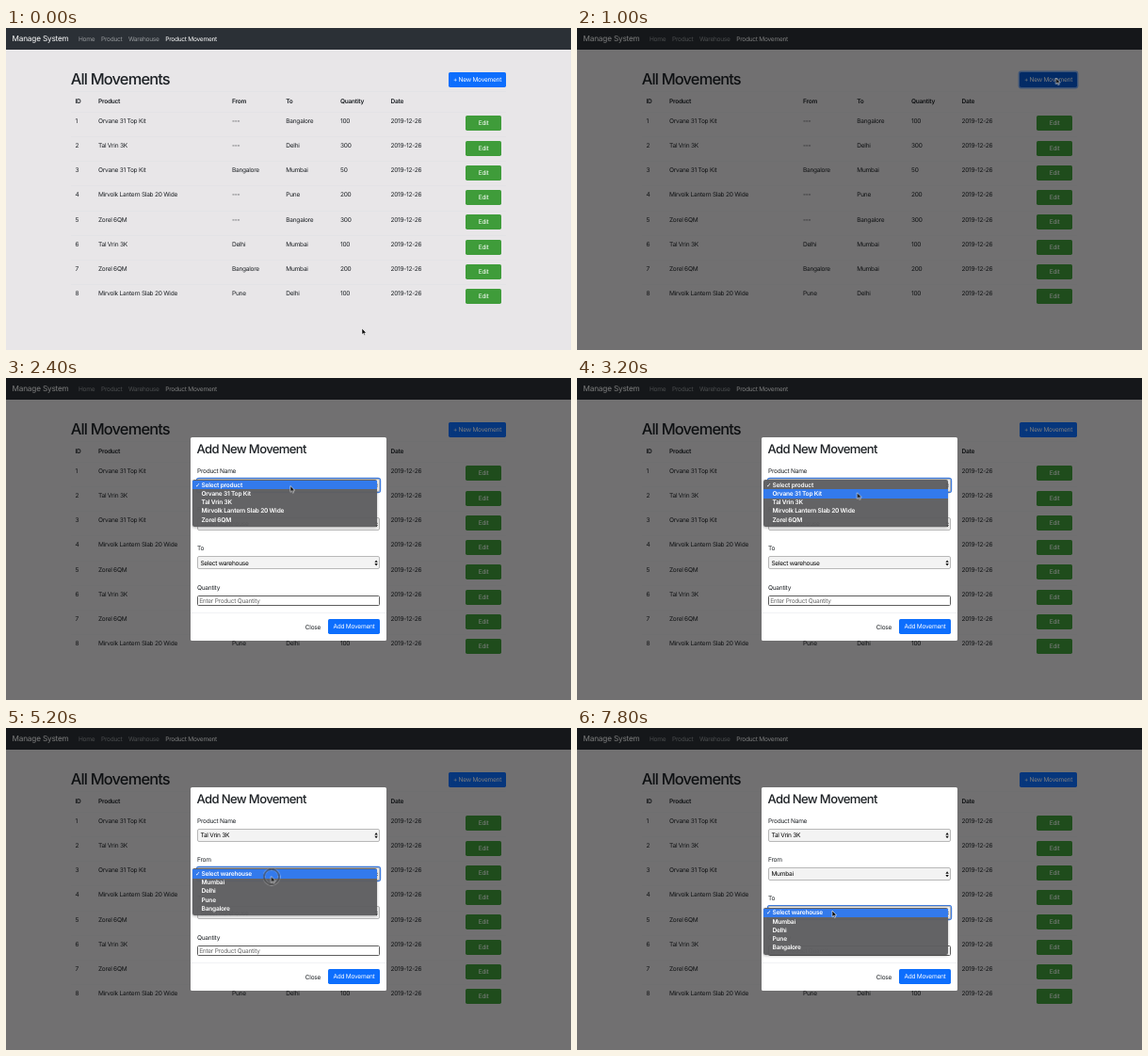
Write an HTML page that moves like this. It is 600 by 342 pixels and loops after 8 s.

```html
<!DOCTYPE html>
<html lang="en">
<head>
<meta charset="utf-8">
<title>Manage System</title>
<style>
html, body { margin: 0; width: 100%; height: 100%; overflow: hidden; }
#stage {
  position: relative; width: 600px; height: 342px; overflow: hidden;
  background: #e8e6e8; color: #1d2125;
  font: 6.57px/10px Inter, "Liberation Sans", sans-serif;
  letter-spacing: -.04em; text-rendering: geometricPrecision;
}
#stage * { position: absolute; box-sizing: border-box; white-space: pre; }
.layer { inset: 0; }
.b { font-weight: 600; }
.nav { left: 0; top: 0; width: 600px; height: 23px; background: #2b3036; color: #96999c; }
.brand { font-size: 8.2px; letter-spacing: -.02em; color: #fff; }
.on { color: #fff; }
.h1, .h2 { font-weight: 500; letter-spacing: -.05em; }
.h1 { font-size: 16.4px; }
.h2 { font-size: 13.1px; }
.line { left: 69px; width: 462px; height: 1px; background: #e3e3e6; }
.btn { height: 16px; border-radius: 1.7px; color: #fff; line-height: 17.4px; text-align: center; }
.edit { left: 488.4px; width: 37.5px; background: #3f9c3a; }
.blue { background: #0d6efd; }

/* 1% of the loop is 80 ms; poses change on a 100 ms beat */
.a { animation: 8s step-end -10ms infinite; }

#new { animation-name: press; }
@keyframes press {
  7.5% { background: #0658d0; box-shadow: none; }
  8.75%, 26.25% { background: #0658d0; box-shadow: 0 0 0 1.4px rgba(13,110,253,.5); }
  27.5% { background: #0d6efd; box-shadow: none; }
}
#shade { background: #000; opacity: 0; animation-name: shade; }
@keyframes shade { 0% { opacity: 0; } 11.25% { opacity: .32; } 12.5%, 100% { opacity: .51; } }

#modal { animation-name: drop; }
@keyframes drop {
  0%, 12.5% { opacity: 0; transform: translateY(-20px); }
  13.75% { opacity: .67; transform: translateY(-9px); }
  15% { opacity: 1; transform: translateY(-2.5px); }
  16.25%, 100% { opacity: 1; transform: none; }
}
.sheet { left: 196px; top: 63px; width: 208px; height: 216px; background: #fff; border-radius: 1.5px; }
.rule { left: 196px; top: 249px; width: 208px; height: 1px; background: #f1f2f4; }
.select { left: 203px; width: 194px; height: 14px; border: 1px solid #b8b8b8; border-radius: 2px; background: #f3f3f3; color: #000; }
.select::after {
  content: ""; position: absolute; right: 1.2px; top: 3px; width: 3.4px; height: 6.2px; background: #111;
  clip-path: polygon(50% 0, 100% 40%, 0 40%, 0 60%, 100% 60%, 50% 100%, 0 60%, 0 40%);
}
.select span { left: 2.4px; top: 1.2px; }
.input { left: 203px; top: 231px; width: 194px; height: 11px; border: 1px solid #5c5c5c; border-radius: 1.5px; background: #fff; color: #666; }
.input span { left: 1.2px; top: -.2px; }
.ring { inset: -1px; border-radius: 2px; box-shadow: 0 0 0 1.2px #3f7bdc; opacity: 0; }
#focus0 { animation-name: focus0; }
#focus1 { animation-name: focus1; }
#focus2 { animation-name: focus2; }
@keyframes focus0 { 0% { opacity: 0; } 27.5% { opacity: 1; } 63.75%, 100% { opacity: 0; } }
@keyframes focus1 { 0% { opacity: 0; } 63.75% { opacity: 1; } 90%, 100% { opacity: 0; } }
@keyframes focus2 { 0% { opacity: 0; } 90%, 100% { opacity: 1; } }
.pick { opacity: 0; }
#old0, #pick0 { animation-name: swap0; }
#old1, #pick1 { animation-name: swap1; }
#old0, #old1 { --from: 1; --to: 0; }
#pick0, #pick1 { --from: 0; --to: 1; }
@keyframes swap0 { 0% { opacity: var(--from); } 50%, 100% { opacity: var(--to); } }
@keyframes swap1 { 0% { opacity: var(--from); } 78.75%, 100% { opacity: var(--to); } }

.menu {
  left: 198px; width: 196px; height: 50px; border-radius: 2px; opacity: 0;
  background: rgba(94,94,96,.97); color: #fff; box-shadow: 0 1px 3px rgba(0,0,0,.3);
}
.menu span { left: 9.5px; font-weight: 600; letter-spacing: -.03em; }
.menu .tick { left: 3px; font: 6.5px/10px "DejaVu Sans", sans-serif; }
.bar { left: 0; top: 1px; width: 196px; height: 9.25px; background: #337aec; }
#menu0 { animation-name: menu0; }
#menu1 { animation-name: menu1; }
#menu2 { animation-name: menu2; }
@keyframes menu0 { 0% { opacity: 0; } 28.75% { opacity: 1; } 48.75% { opacity: .4; } 50% { opacity: .1; } 51.25%, 100% { opacity: 0; } }
@keyframes menu1 { 0% { opacity: 0; } 65% { opacity: 1; } 77.5% { opacity: .4; } 78.75% { opacity: .1; } 80%, 100% { opacity: 0; } }
@keyframes menu2 { 0% { opacity: 0; } 91.25%, 100% { opacity: 1; } }
#bar0 { animation-name: bar0; }
#bar1 { animation-name: bar1; }
@keyframes bar0 { 0% { top: 1px; } 38.75% { top: 10.25px; } 42.5%, 100% { top: 19.5px; } }
@keyframes bar1 { 0% { top: 1px; } 71.25%, 100% { top: 10.25px; } }

#cursor { left: 0; top: 0; animation-name: roam; }
#cursor svg { left: -1px; top: -1px; }
@keyframes roam {
  0%, 2.5% { transform: translate(378px, 319px); }
  3.75% { transform: translate(390px, 293px); animation-timing-function: steps(2); }
  6.25% { transform: translate(485px, 100px); animation-timing-function: steps(2); }
  8.75% { transform: translate(508.5px, 53px); }
  20% { transform: translate(508.5px, 53px); animation-timing-function: steps(5); }
  26.25% { transform: translate(302px, 114.5px); }
  37.5% { transform: translate(302px, 114.5px); animation-timing-function: steps(5); }
  43.75% { transform: translate(290.7px, 132.5px); }
  52.5% { transform: translate(290.7px, 132.5px); animation-timing-function: steps(5); }
  58.75% { transform: translate(281.5px, 157px); }
  60% { transform: translate(281.5px, 157.5px); }
  68.75% { transform: translate(281.5px, 157.5px); animation-timing-function: steps(4); }
  73.75% { transform: translate(281px, 163.5px); }
  80% { transform: translate(281px, 163.5px); animation-timing-function: steps(5); }
  86.25%, 100% { transform: translate(271px, 194px); }
}
#click {
  left: -8px; top: -8px; width: 17px; height: 17px; border-radius: 50%; opacity: 0;
  border: 1.3px solid #111; box-shadow: 0 0 0 .6px rgba(255,255,255,.6), inset 0 0 0 .6px rgba(255,255,255,.6);
  animation-name: click;
}
@keyframes click {
  0%, 10%, 30%, 47.5%, 66.25%, 77.5%, 92.5%, 100% { opacity: 0; }
  8.75%, 27.5%, 45%, 63.75%, 75%, 90% { opacity: 1; }
}
</style>
</head>
<body>
<div id="stage"></div>
<script>
const products = ["Orvane 31 Top Kit", "Tal Vrin 3K", "Mirvolk Lantern Slab 20 Wide", "Zorel 6QM"];
const cities = ["Mumbai", "Delhi", "Pune", "Bangalore"];
const columns = [73.5, 98, 240, 297.3, 355, 408.5];

// product, from, to, quantity
const moves = [
  [0, -1, 3, 100], [1, -1, 1, 300], [0, 3, 0, 50], [2, -1, 2, 200],
  [3, -1, 3, 300], [1, 1, 0, 100], [3, 3, 0, 200], [2, 2, 1, 100]
];

const text = (x, mid, s, cls = "") =>
  `<span class="${cls}" style="left:${x}px;top:${mid - 5}px">${s}</span>`;
const row = (cells, mid, cls) => cells.map((c, i) => text(columns[i], mid, c, cls)).join("");

function table() {
  let out = row(["ID", "Product", "From", "To", "Quantity", "Date"], 77.6, "b");
  out += `<div class="line" style="top:67px"></div>`;
  moves.forEach(([p, from, to, n], i) => {
    const top = 88.7 + 26.25 * i;
    out += `<div class="line" style="top:${top}px"></div>`;
    out += row([i + 1, products[p], cities[from] || "---", cities[to], n, "2019-12-26"], top + 9.9);
    out += `<div class="btn edit" style="top:${top + 4.7}px">Edit</div>`;
  });
  return out;
}

function select(i, label, hint, pick) {
  const top = 107 + 41.2 * i;
  const picked = pick ? `<span class="a pick" id="pick${i}">${pick}</span>` : "";
  return text(203, top - 8.4, label) +
    `<div class="select" style="top:${top}px"><span class="a" id="old${i}">${hint}</span>${picked}
     <div class="a ring" id="focus${i}"></div></div>`;
}

function menu(i, hint, items) {
  const list = [hint, ...items].map((s, k) => text(9.5, 5.7 + 9.25 * k, s)).join("");
  return `<div class="a menu" id="menu${i}" style="top:${108 + 41.3 * i}px">
    <div class="a bar" id="bar${i}"></div>${text(3, 5.6, "✓", "tick")}${list}</div>`;
}

const pickProduct = "Select product", pickPlace = "Select warehouse";

document.getElementById("stage").innerHTML = `
<div class="nav">
  ${text(6.5, 11.4, "Manage System", "brand")}
  ${text(77, 11.5, "Home")}${text(101, 11.5, "Product")}
  ${text(130, 11.5, "Warehouse")}${text(169.3, 11.5, "Product Movement", "on")}
</div>
${text(68.7, 53.9, "All Movements", "h1")}
<div class="a btn blue" id="new" style="left:470px;top:47.4px;width:61px">+ New Movement</div>
${table()}
<div class="a layer" id="shade"></div>
<div class="a layer" id="modal">
  <div class="sheet"></div><div class="rule"></div>
  ${text(202.5, 76.4, "Add New Movement", "h2")}
  ${select(0, "Product Name", pickProduct, products[1])}
  ${select(1, "From", pickPlace, cities[0])}
  ${select(2, "To", pickPlace)}
  ${text(203, 222.5, "Quantity")}
  <div class="input"><span>Enter Product Quantity</span></div>
  ${text(317.8, 264.7, "Close")}
  <div class="btn blue" style="left:342px;top:256.2px;width:55px">Add Movement</div>
</div>
${menu(0, pickProduct, products)}${menu(1, pickPlace, cities)}${menu(2, pickPlace, cities)}
<div class="a" id="cursor">
  <div class="a" id="click"></div>
  <svg width="8" height="11" viewBox="-1 -1 8 11">
    <path d="M0 0V6.6L1.5 5.2 2.6 7.6 3.6 7.1 2.6 4.9H4.7Z" fill="#000" stroke="#fff" stroke-width=".6"/>
  </svg>
</div>`;
</script>
</body>
</html>
```
